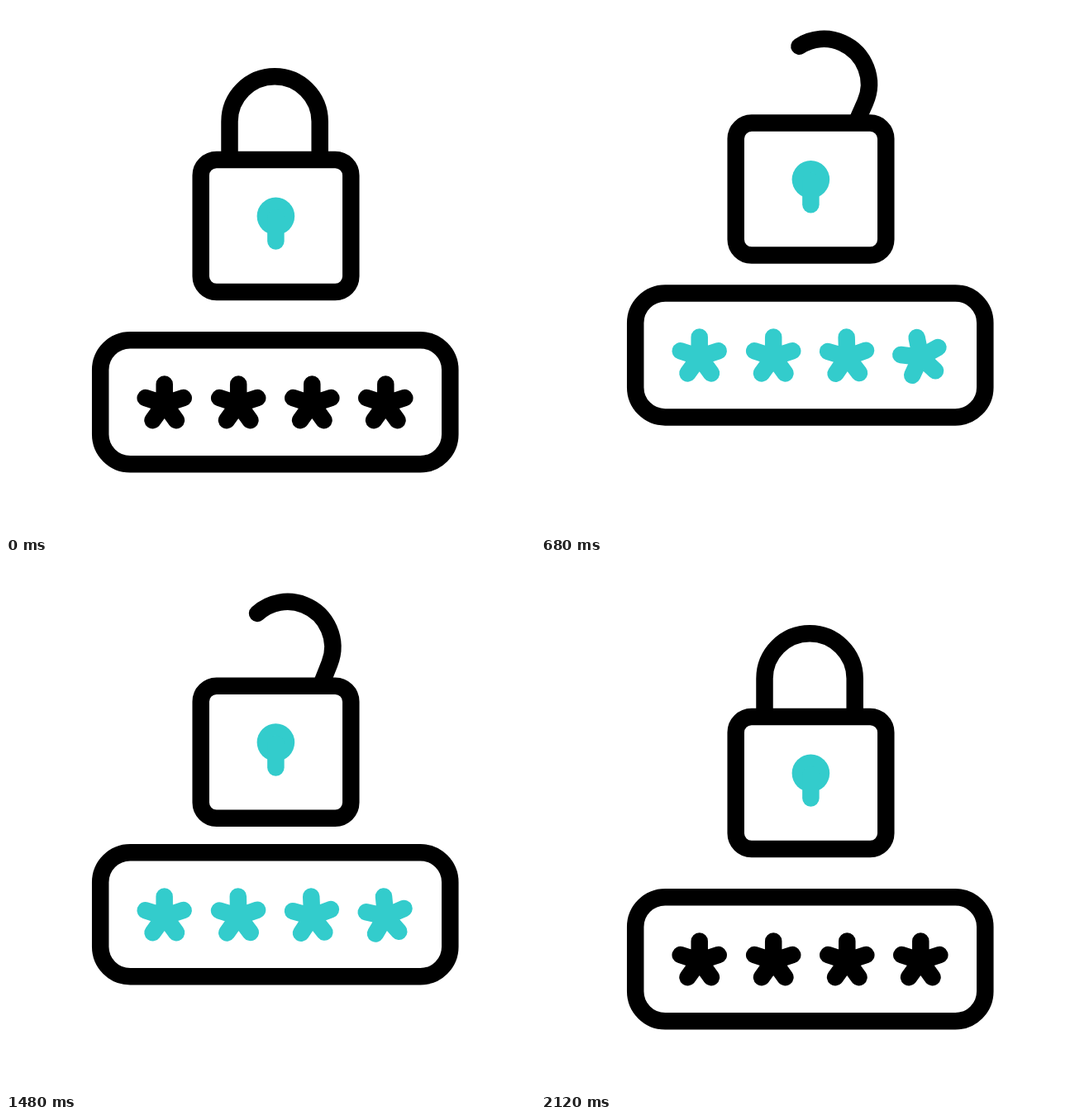
An HTML page that plays this animation: 640x640 px, repeating every 2480 ms.

```html
<!DOCTYPE html>
<html lang="en">
<head>
<meta charset="utf-8">
<title>Password lock</title>
<style>
  html, body { margin: 0; width: 100%; height: 100%; overflow: hidden; background: #fff; }
  svg { display: block; width: 100%; height: 100%; }
  .line { stroke: #000; stroke-width: 20.5; stroke-linecap: round; }
</style>
</head>
<body>
<svg viewBox="0 0 640 640">
  <g id="lock">
    <g id="shackle">
      <path id="bow" class="line" fill="none" d="M379.7 180V139.8A54.6 54.6 0 0 0 270.5 139.8V177"/>
    </g>
    <rect class="line" x="235.7" y="186" width="181.6" height="160" rx="19" fill="#fff"/>
    <circle cx="326.4" cy="254.3" r="22.8" fill="#3cc"/>
    <path d="M326.4 256V284.6" stroke="#3cc" stroke-width="20.5" stroke-linecap="round"/>
  </g>
  <g id="field">
    <rect class="line" x="114.2" y="404.2" width="423.1" height="150" rx="36" fill="#fff"/>
  </g>
</svg>
<script>
const LOOP = 2480, STEP = 40;
const BLACK = '#000', TEAL = '#3cc';
const BOW_LENGTH = 248.9;
const $ = id => document.getElementById(id);
const lock = $('lock'), shackle = $('shackle'), bow = $('bow'), field = $('field');

// Each star has five arms.
const arms = [0, 1, 2, 3, 4].map(i => {
  const a = i * Math.PI * 0.4;
  return `M0 0L${(24.2 * Math.sin(a)).toFixed(2)} ${(-24.2 * Math.cos(a)).toFixed(2)}`;
}).join('');

const stars = [191.7, 281.2, 370.3, 459.3].map(x => {
  const node = document.createElementNS('http://www.w3.org/2000/svg', 'path');
  node.setAttribute('d', arms);
  node.setAttribute('class', 'line');
  field.appendChild(node);
  return { x, node };
});

// Cubic Bezier easing with control points (a, 0) and (b, 1).
function ease(x, a, b) {
  if (x <= 0) return 0;
  if (x >= 1) return 1;
  let lo = 0, hi = 1;
  for (let i = 0; i < 30; i++) {
    const s = (lo + hi) / 2, r = 1 - s;
    if (3 * a * s * r * r + 3 * b * s * s * r + s ** 3 < x) lo = s;
    else hi = s;
  }
  return lo * lo * (3 - 2 * lo);
}

const move = (t, start, span, a, b = 0.2) => ease((t - start) / span, a, b);

function draw(t) {
  const lift = 53 * (move(t, 107, 966, 0.65) - move(t, 1076, 1015, 0.68));
  const rise = 72 * (move(t, 198, 880, 0.6) - move(t, 1169, 965, 0.55));
  const open = move(t, 80, 873, 0.73) - move(t, 1199, 864, 0.65);

  lock.setAttribute('transform', `translate(0 ${-lift})`);
  field.setAttribute('transform', `translate(0 ${-rise})`);
  shackle.setAttribute('transform', `rotate(${26 * open} 335.8 180)`);
  bow.setAttribute('stroke-dasharray', `${BOW_LENGTH - 75 * open} 999`);

  stars.forEach(({ x, node }, i) => {
    const start = 95 + 104 * i;
    const turn = move(t, start, 462, 0.6);
    const back = move(t, 1449 - 40 * i, 660, 0.6);
    node.setAttribute('transform', `translate(${x} 481.6) rotate(${72 * (turn - back)})`);
    node.style.stroke = t > start && back < 0.36 ? TEAL : BLACK;
  });
}

const origin = performance.now();
function tick() {
  const t = (performance.now() - origin) % LOOP;
  draw(Math.floor(t / STEP) * STEP);
  requestAnimationFrame(tick);
}
draw(0);
requestAnimationFrame(tick);
</script>
</body>
</html>
```
